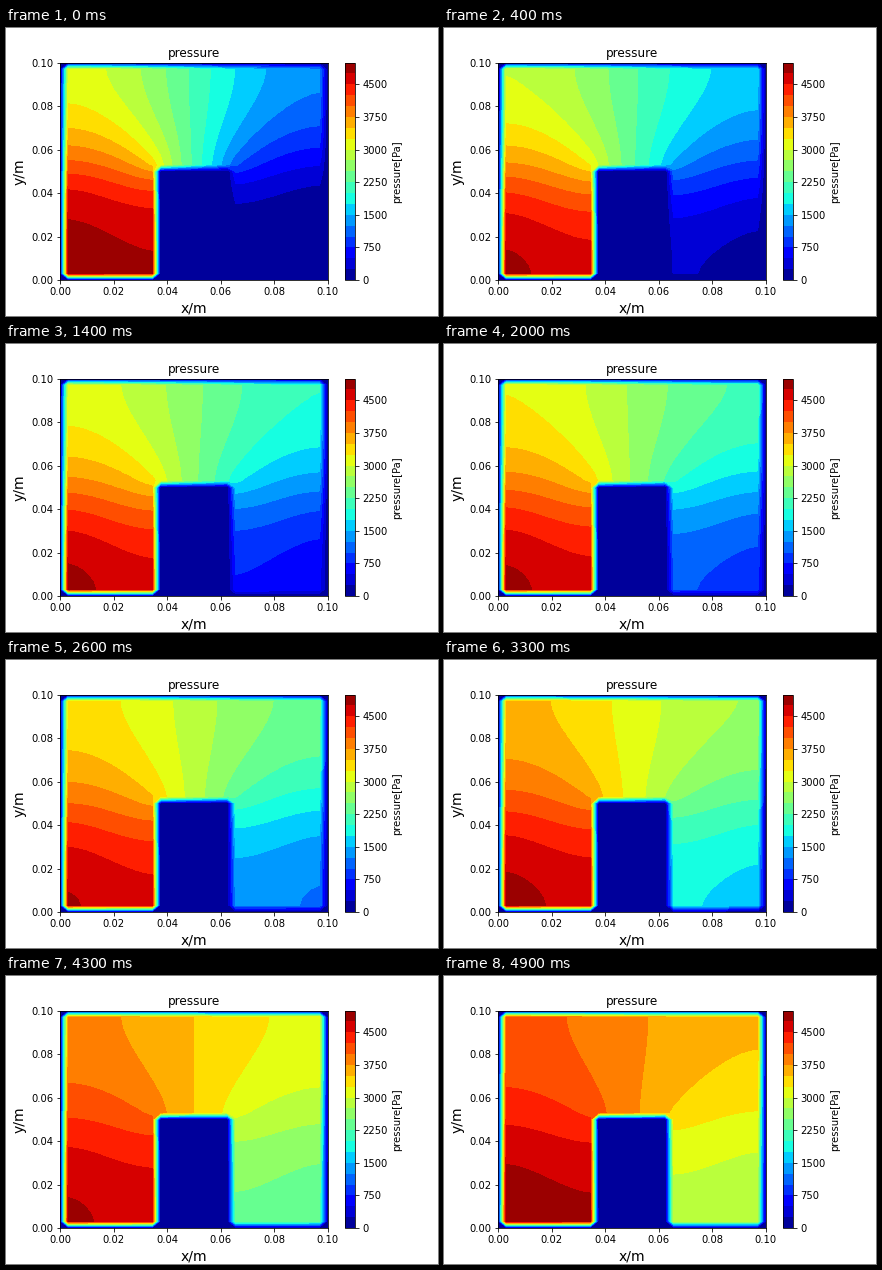
A matplotlib script that plays this animation: 432 by 288 pixels, repeating every 5000 ms.

```python
import numpy as np
import matplotlib.pyplot as plt
from matplotlib.animation import FuncAnimation

FRAMES, INTERVAL = 50, 100
N, SIZE = 33, 0.1
LEVELS = np.arange(0, 5001, 250)

coords = np.linspace(0, SIZE, N)
X, Y = np.meshgrid(np.linspace(-0.5, 0.5, N), np.linspace(0, 1, N))

# Walls and the block in the middle stay at zero pressure
fluid = np.zeros((N, N), bool)
fluid[1:-1, 1:-1] = True
fluid[(np.abs(X) <= 0.125) & (Y <= 0.5)] = False


def flow_shape():
    """Poisson solution, 0..1: gas leaves the left chamber and fills the right."""
    count = fluid.sum()
    index = np.full((N, N), -1)
    index[fluid] = np.arange(count)
    laplacian = np.zeros((count, count))
    for a, b in ((index[:, :-1], index[:, 1:]), (index[:-1], index[1:])):
        linked = (a >= 0) & (b >= 0)
        a, b = a[linked], b[linked]
        laplacian[a, b] = laplacian[b, a] = -1
    np.fill_diagonal(laplacian, -laplacian.sum(axis=1))
    source = np.where(Y < 0.5, -X**3, 0)[fluid]
    u = np.linalg.lstsq(laplacian, source, rcond=None)[0]
    return ((u - u.min()) / np.ptp(u)) ** 1.1


SHAPE = flow_shape()
STEEP = SHAPE**2 * (3 - 2 * SHAPE)


def pressure(t):
    low = 350 * t + 47 * t**2
    high = 4800 + 35 * np.cos(2 * np.pi * t / 1.65) + 65 * (t / 4.9) ** 12
    front = 0.9 * np.exp(-t / 0.3)
    field = np.zeros((N, N))
    field[fluid] = low + (high - low) * (SHAPE + front * (STEEP - SHAPE))
    return field


def contours(t):
    return ax.contourf(coords, coords, pressure(t), levels=LEVELS, cmap="jet")


plt.rcParams.update({"font.family": "DejaVu Sans", "font.size": 10})
fig, ax = plt.subplots(figsize=(6, 4), dpi=72)
fig.subplots_adjust(left=0.125, right=0.9, bottom=0.125, top=0.88)
current = contours(0)
fig.colorbar(current, ax=ax, ticks=LEVELS[::3]).set_label("pressure[Pa]")
ax.set(xlim=(0, SIZE), ylim=(0, SIZE), title="pressure",
       xticks=np.linspace(0, SIZE, 6), yticks=np.linspace(0, SIZE, 6))
ax.set_xlabel("x/m", fontsize=14)
ax.set_ylabel("y/m", fontsize=14)


def update(frame):
    global current
    current.remove()
    current = contours(frame * INTERVAL / 1000)
    return [current]


anim = FuncAnimation(fig, update, frames=FRAMES, interval=INTERVAL,
                     repeat=True, repeat_delay=0)
plt.show()
```
